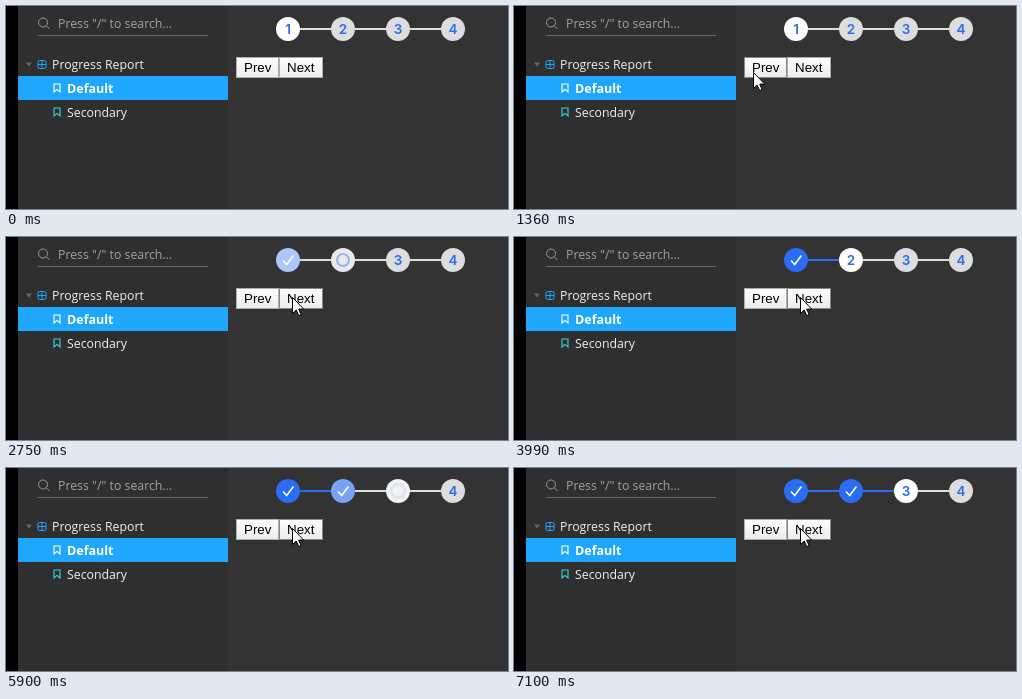
Recreate the animation shown at these times as an HTML page. Size 502x203 px, loop 8 s.

```html
<!DOCTYPE html>
<html lang="en">
<head>
<meta charset="utf-8">
<title>Progress steps</title>
<style>
  html, body { margin: 0; width: 100%; height: 100%; overflow: hidden; background: #333; }
  svg { display: block; width: 502px; height: 203px; }
  .menu { font: 12.3px "Open Sans", sans-serif; fill: #f0f0f0; }
  .button { font: 13.333px "Liberation Sans", Arial, sans-serif; fill: #000; }
  .number { font: 600 13.5px Inter, sans-serif; fill: #2a6df4; text-anchor: middle; }
</style>
</head>
<body>
<svg viewBox="0 0 502 203">
  <defs>
    <linearGradient id="face" x2="0" y2="1"><stop stop-color="#fdfdfd"/><stop offset="1" stop-color="#ececec"/></linearGradient>
    <linearGradient id="pressed" x2="0" y2="1"><stop stop-color="#e4e4e4"/><stop offset="1" stop-color="#f4f4f4"/></linearGradient>
    <path id="bookmark" d="M.5.5h6v8l-3-2.6-3 2.6z" fill="none" stroke-width="1.1"/>
  </defs>
  <rect width="502" height="203" fill="#333"/>
  <rect width="222" height="203" fill="#2f2f2f"/>
  <rect width="12" height="203"/>
  <rect x="12" y="70" width="210" height="24" fill="#1ea7fd"/>

  <g class="menu">
    <g fill="none" stroke="#999"><circle cx="37" cy="16.5" r="4.5"/><path d="M40.3 19.8l3.2 3.2"/></g>
    <path d="M32 29.5h170" stroke="#686868"/>
    <text x="52" y="22" style="fill:#a2a2a2">Press "/" to search...</text>
    <path d="M20 56.5h6l-3 4z" fill="#666"/>
    <rect x="32" y="54.5" width="8" height="8" rx="1.5" fill="none" stroke="#1ea7fd"/>
    <path d="M36 54.5v8M32 58.5h8" stroke="#1ea7fd"/>
    <text x="46" y="63">Progress Report</text>
    <use href="#bookmark" x="47.5" y="77.5" stroke="#fff"/>
    <text x="61" y="87" font-weight="700" fill="#fff" style="font-size:12.5px">Default</text>
    <use href="#bookmark" x="47.5" y="101.5" stroke="#37d5d3"/>
    <text x="61" y="111">Secondary</text>
  </g>

  <g class="button">
    <rect id="prev" x="230.5" y="51.5" width="42" height="20" fill="url(#face)"/>
    <rect id="next" x="273.5" y="51.5" width="43" height="20" fill="url(#face)"/>
    <text x="238" y="66">Prev</text>
    <text x="281" y="66">Next</text>
  </g>

  <g id="steps"></g>
  <path id="cursor" d="M.5.5v16l3.7-3.5 2.5 5.6 2.4-1-2.4-5.5h5z" fill="#fff" stroke="#000" stroke-linejoin="round"/>
</svg>
<script>
const LOOP = 8000;
const CLICKS = [2490, 5470];
const CURSOR = [[250, 366, 204], [540, 324, 153], [860, 247, 72], [980, 239, 66],
                [1360, 239, 66], [1700, 272, 62], [1960, 286, 60]];
const $ = id => document.getElementById(id);
const clamp = v => Math.max(0, Math.min(1, v));
const ramp = (t, start, length) => clamp((t - start) / length);
const mix = (a, b, p) => `rgb(${a.map((v, i) => Math.round(v + (b[i] - v) * p))})`;
const GREY = [221, 221, 221], WHITE = [255, 255, 255], BLUE = [42, 109, 244];

function set(node, attrs) {
  for (const key in attrs) node.setAttribute(key, attrs[key]);
}
function add(parent, tag, attrs, text = '') {
  const node = document.createElementNS('http://www.w3.org/2000/svg', tag);
  set(node, attrs);
  node.textContent = text;
  return parent.appendChild(node);
}

const steps = [0, 1, 2, 3].map(i => {
  const x = 282 + 55 * i, root = $('steps');
  if (i < 3) add(root, 'path', { d: `M${x + 12} 23h31`, stroke: '#ddd', 'stroke-width': 2 });
  return {
    x,
    fill: i < 3 && add(root, 'path', { stroke: '#2a6df4', 'stroke-width': 2 }),
    disc: add(root, 'circle', { cx: x, cy: 23, r: 12 }),
    ring: add(root, 'circle', { cx: x, cy: 23, fill: 'none', stroke: '#2a6df4' }),
    number: add(root, 'text', { x, y: 28, class: 'number' }, i + 1),
    check: add(root, 'path', { d: `M${x - 5} 23.5l3.7 4 6.7-9`, fill: 'none', stroke: '#fff', 'stroke-width': 1.6 })
  };
});

function drawStep(step, i, t) {
  const leave = i < CLICKS.length ? t - CLICKS[i] : -1;
  const enter = i === 0 ? LOOP : i <= CLICKS.length ? t - CLICKS[i - 1] : -1;
  const done = ramp(leave, 0, 680), active = ramp(enter, 0, 660);

  step.disc.setAttribute('fill', done > 0 ? mix(WHITE, BLUE, done) : mix(GREY, WHITE, active));
  step.check.setAttribute('opacity', ramp(done, 0, 0.4));
  const shown = enter < 0 ? 1 : Math.max(1 - ramp(enter, 0, 180), ramp(enter, 850, 630));
  step.number.setAttribute('opacity', shown * (1 - ramp(done, 0, 0.3)));
  // The ring widens and fades while the step becomes active.
  set(step.ring, {
    r: 4.8 + 3 * active,
    'stroke-width': 0.5 + 4 * active,
    opacity: i ? Math.min(ramp(active, 0, 0.3), clamp(0.92 - 1.25 * active)) : 0
  });
  if (step.fill) step.fill.setAttribute('d', `M${step.x + 12} 23h${31 * ramp(leave, 500, 800)}`);
}

function cursorAt(t) {
  const k = CURSOR.findIndex(p => p[0] > t);
  if (k === 0) return [0, 300];
  if (k < 0) return CURSOR[CURSOR.length - 1].slice(1);
  const [a, b] = [CURSOR[k - 1], CURSOR[k]], p = ramp(t, a[0], b[0] - a[0]);
  return [1, 2].map(j => Math.round(a[j] + (b[j] - a[j]) * p));
}

function draw(now) {
  const t = now % LOOP, [x, y] = cursorAt(t);
  steps.forEach((step, i) => drawStep(step, i, t));
  $('cursor').setAttribute('transform', `translate(${x} ${y})`);
  const over = (left, right) => x >= left && x < right && y > 50 && y < 72;
  $('prev').setAttribute('stroke', over(230, 273) ? '#888' : '#adadad');
  $('next').setAttribute('stroke', over(273, 317) ? '#888' : '#adadad');
  const down = CLICKS.some(c => t >= c && t < c + 100);
  $('next').setAttribute('fill', down ? 'url(#pressed)' : 'url(#face)');
  requestAnimationFrame(() => draw(performance.now() - start));
}
const start = performance.now();
draw(0);
</script>
</body>
</html>
```
